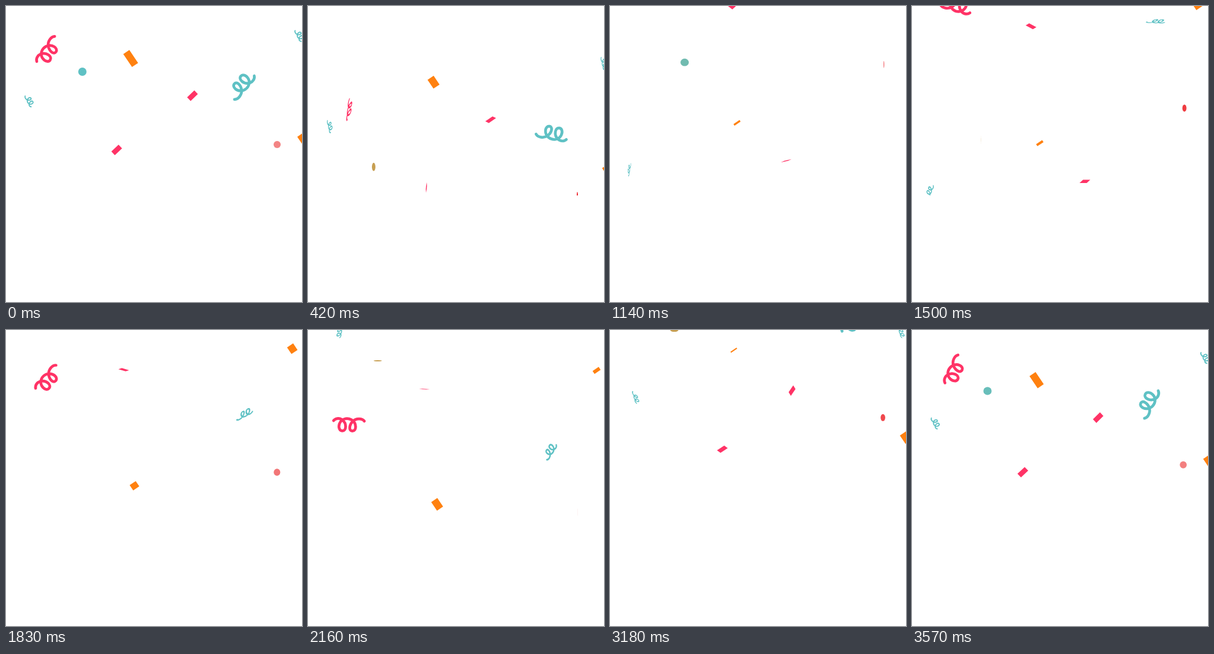
Write an HTML page that moves like this. It is 500x500 px and loops after 3600 ms.

```html
<!DOCTYPE html>
<html lang="en">
<head>
<meta charset="utf-8">
<title>Confetti</title>
<style>
  html, body { margin: 0; width: 100%; height: 100%; overflow: hidden; background: #fff; }
  svg { display: block; width: 500px; height: 500px; }
</style>
</head>
<body>
<svg viewBox="0 0 500 500">
  <clipPath id="fall"><rect width="500" height="320"/></clipPath>
  <g id="layer" clip-path="url(#fall)"></g>
</svg>
<script>
const LOOP = 3600, STEP = 30, TOP = -22, BOTTOM = 342;
const PINK = '#ff3366', TEAL = '#5fc1c4', ORANGE = '#ff8110';
const CURL = 'M-26 6C-22 11-12 11-6 5C0-2 0-11-6-11C-13-11-14 2-4 8' +
             'C4 12 13 9 16 1C18-5 16-11 11-11C4-11 3 2 12 8C17 11 23 10 26 6';
const RAD = Math.PI / 180;
const layer = document.getElementById('layer');
const pieces = [];

// Each piece has one resting pose, reached at time `at`.
// Speeds are per ms: one number, or [before, after] that pose.
function move(speed, dt) {
  return (Array.isArray(speed) ? speed[dt < 0 ? 0 : 1] : speed || 0) * dt;
}

// Full size at the resting pose, turning edge-on with distance in time
function narrow(speed, dt) {
  return 1 - Math.abs(move(speed, dt));
}

function add(tag, attrs, p, pose) {
  const el = document.createElementNS('http://www.w3.org/2000/svg', tag);
  for (const name in attrs) el.setAttribute(name, attrs[name]);
  pieces.push({ el: layer.appendChild(el), p, pose });
}

function block(w, h, fill) {
  return { x: -w / 2, y: -h / 2, width: w, height: h, fill };
}

function curl(color, p) {
  const look = {
    d: CURL, fill: 'none', stroke: color, 'stroke-width': 4.7,
    'stroke-linecap': 'round', 'stroke-linejoin': 'round'
  };
  add('path', look, p, dt => {
    const flip = ((p.tip || 0) + move(p.flip, dt)) * RAD;
    const size = (p.size || 1) / (1 + move(p.shrink, dt));
    const lean = 0.6 * Math.sin(flip);
    return `rotate(${p.deg + move(p.spin, dt)}) scale(${size}) ` +
           `matrix(1 0 ${lean} ${Math.cos(flip)} 0 0)`;
  });
}

function strip(p) {
  add('rect', block(26.4, 12.4, ORANGE), p, dt => `rotate(56) scale(${narrow(p.sx, dt)} 1)`);
}

function flake(p) {
  add('rect', block(16.8, 8.6, PINK), p, dt => {
    const sy = narrow(p.sy, dt), shear = -(p.tilt || 0) * (1 - sy);
    return `matrix(${narrow(p.sx, dt)} ${shear} 0 ${sy} 0 0) rotate(-43.5)`;
  });
}

function dot(r, from, to, p) {
  add('circle', { r }, p, (dt, el) => {
    const sx = narrow(p.sx, dt), sy = narrow(p.sy, dt);
    const k = 0.65 * Math.min(1, 2 * (1 - Math.min(Math.abs(sx), Math.abs(sy))));
    el.setAttribute('fill', `rgb(${from.map((v, i) => Math.round(v + (to[i] - v) * k))})`);
    return `scale(${sx} ${sy})`;
  });
}

// Large streamers pass twice per loop
curl(PINK, { at: 0, x: 72, y: 76, drift: -0.005, fall: [0.255, 0.231],
             deg: 125.5, spin: [0.35, -0.07], flip: [0, 0.155], shrink: [0, 1 / 900] });
curl(PINK, { at: 1800, x: 72, y: 76, drift: -0.008, fall: [0.258, 0.232],
             deg: 127, spin: [0.37, 0.15] });
curl(TEAL, { at: 0, x: 398, y: 134, drift: [-0.03, 0.033], fall: [0.36, 0.193],
             deg: -50, spin: [0.45, 0.143] });
curl(TEAL, { at: 1800, x: 402.5, y: 136, drift: [-0.035, 0.018], fall: [0.367, 0.19],
             deg: -25, spin: -0.09, size: 0.57, tip: -41, flip: 0.066 });

// Small streamers
const tumble = { at: 0, deg: 61, spin: [-0.027, 0.035], size: 0.4, flip: 0.1 };
curl(TEAL, { ...tumble, x: 39.5, y: 160, drift: [-0.0097, -0.0062], fall: [0.109, 0.101] });
curl(TEAL, { ...tumble, x: 495.5, y: 49.5, drift: 0.009, fall: 0.11 });

strip({ at: 0, x: 210.6, y: 88.7, drift: 0.0035, fall: [0.13, 0.0953], sx: [0.0022, 0.00077] });
strip({ at: 0, x: 504.5, y: 228.4, drift: [0.0118, 0.004], fall: [0.1112, 0.115],
        sx: [0.00085, 0.001] });

flake({ at: 0, x: 187, y: 243.2, drift: [-0.0067, 0.031], fall: [0.0995, 0.151],
        sx: [0, 0.0021], sy: [0.00074, 0] });
flake({ at: 0, x: 315, y: 151.5, drift: [0.0178, -0.0153], fall: [0.117, 0.0965],
        sx: [0.00085, 0], sy: [0, 0.00098], tilt: 0.3 });

// Dots: three teal passes and two pink ones per loop
const BLUE = [95, 193, 196], AMBER = [255, 140, 20];
const SALMON = [243, 132, 132], RED = [236, 0, 10];
const sway = { x: 129, y: 111, drift: [0.0485, -0.043], fall: [0.264, 0.383] };
dot(7, BLUE, AMBER, { ...sway, at: 0, sx: [0, 0.00136], sy: [0.0014, 0] });
dot(7, BLUE, AMBER, { ...sway, at: 1200, sx: [0, 0.0033], sy: [0.00146, 0] });
dot(7, BLUE, AMBER, { ...sway, at: 2400, drift: [0.0465, -0.057], fall: [0.246, 0.497],
                      sx: [0, 0.0024], sy: [0.0036, 0] });

const sink = { x: 458, y: 234, drift: -0.0072, fall: 0.205 };
dot(6, SALMON, RED, { ...sink, at: 0, sx: [0.00083, 0.0028] });
dot(6, SALMON, RED, { ...sink, at: 1800, sx: [0.0014, 0.0028] });

function render(time) {
  const now = Math.floor((time % LOOP) / STEP) * STEP;
  for (const { el, p, pose } of pieces) {
    const height = dt => p.y + move(p.fall, dt);
    const dt = [0, -LOOP, LOOP].map(shift => now - p.at + shift)
      .find(d => height(d) > TOP && height(d) < BOTTOM);
    el.style.display = dt === undefined ? 'none' : '';
    if (dt === undefined) continue;
    const place = `translate(${p.x + move(p.drift, dt)} ${height(dt)})`;
    el.setAttribute('transform', `${place} ${pose(dt, el)}`);
  }
}

let start;
function tick(time) {
  if (start === undefined) start = time;
  render(Math.max(0, time - start));
  requestAnimationFrame(tick);
}
render(0);
requestAnimationFrame(tick);
</script>
</body>
</html>
```
